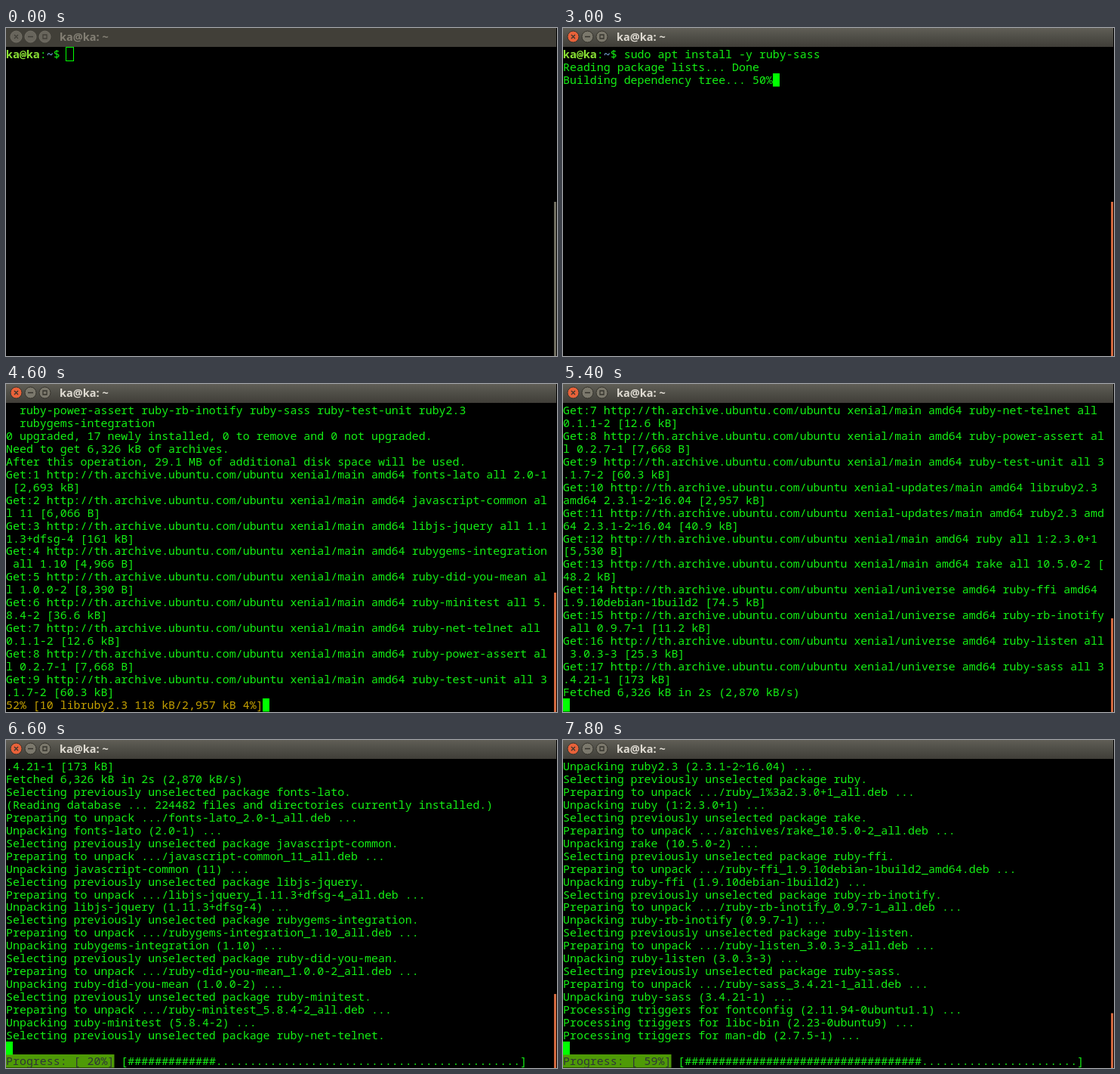
These frames come from a looping animation (730x434 px, 8000 ms). An HTML page:

```html
<!DOCTYPE html>
<html lang="en">
<head>
<meta charset="utf-8">
<title>Terminal</title>
<style>
  html, body { margin: 0; width: 100%; height: 100%; overflow: hidden; background: #000; }
  svg { display: block; width: 730px; height: 434px; }
  .row { font: 14.95px "Noto Sans Mono", monospace; white-space: pre; }
  #title { font: 700 14.5px "Noto Sans", sans-serif; }
</style>
</head>
<body>
<svg viewBox="0 0 730 434">
  <defs>
    <linearGradient id="active" x2="0" y2="1">
      <stop offset="0" stop-color="#605e56"/>
      <stop offset=".45" stop-color="#504f48"/>
      <stop offset="1" stop-color="#403e38"/>
    </linearGradient>
  </defs>
  <rect width="730" height="434"/>
  <rect id="bar" width="729" height="25"/>
  <g id="buttons" stroke-width="1">
    <circle cx="13.5" cy="11.5" r="7.5"/>
    <circle cx="32.5" cy="11.5" r="7.5"/>
    <circle cx="51.5" cy="11.5" r="7.5"/>
  </g>
  <path id="marks" d="M11 9l5 5m0-5l-5 5M29 11.5h7M49 9h5v5h-5z" fill="none" stroke-width="1.3"/>
  <text id="title" x="71" y="17">ka@ka: ~</text>
  <rect id="thumb" x="726" width="3"/>
  <rect id="badge" y="416" width="143.5" height="17.5" fill="#4e9a06"/>
  <rect id="cursor" stroke="#00ff00"/>
  <g id="rows"></g>
  <path id="pointer" d="M-3 -7.5h2l1 1 1-1h2M0 -6.5v13M-3 7.5h2l1-1 1 1h2" fill="none" stroke="#c8c8a0" stroke-width="1.2"/>
</svg>
<script>
const $ = id => document.getElementById(id);
const CELL = 8.97, LINE = 16.95, COLS = 80, ROWS = 24, STEP = 200, LOOP = 8000;
const GREEN = '#14f014', YELLOW = '#c4a000', LIME = '#8ae234', BLUE = '#729fcf', DARK = '#2e3436';

// name, version, section, size, architecture
const packages = `fonts-lato 2.0-1 main 2,693_kB
javascript-common 11 main 6,066_B
libjs-jquery 1.11.3+dfsg-4 main 161_kB
rubygems-integration 1.10 main 4,966_B
ruby-did-you-mean 1.0.0-2 main 8,390_B
ruby-minitest 5.8.4-2 main 36.6_kB
ruby-net-telnet 0.1.1-2 main 12.6_kB
ruby-power-assert 0.2.7-1 main 7,668_B
ruby-test-unit 3.1.7-2 main 60.3_kB
libruby2.3 2.3.1-2~16.04 updates 2,957_kB amd64
ruby2.3 2.3.1-2~16.04 updates 40.9_kB amd64
ruby 1:2.3.0+1 main 5,530_B
rake 10.5.0-2 main 48.2_kB
ruby-ffi 1.9.10debian-1build2 universe 74.5_kB amd64
ruby-rb-inotify 0.9.7-1 universe 11.2_kB
ruby-listen 3.0.3-3 universe 25.3_kB
ruby-sass 3.4.21-1 universe 173_kB`.split('\n').map(line => {
  const [name, version, section, size, arch = 'all'] = line.split(' ');
  return { name, version, section, size: size.replace('_', ' '), arch };
});

const command = 'sudo apt install -y ruby-sass';
const prompt = [['ka@ka', LIME, 700], [':', GREEN], ['~', BLUE, 700], ['$ ', GREEN]];
const common = `  fonts-lato javascript-common libjs-jquery libruby2.3 rake ruby
  ruby-did-you-mean ruby-ffi ruby-listen ruby-minitest ruby-net-telnet
  ruby-power-assert ruby-rb-inotify `;
const plain = text => [[text, GREEN]];

const head = `Reading package lists... Done
Building dependency tree
Reading state information... Done
The following additional packages will be installed:
${common}ruby-test-unit ruby2.3
  rubygems-integration
Suggested packages:
  apache2 | lighttpd | httpd ri ruby-dev bundler
The following NEW packages will be installed:
${common}ruby-sass ruby-test-unit ruby2.3
  rubygems-integration
0 upgraded, 17 newly installed, 0 to remove and 0 not upgraded.
Need to get 6,326 kB of archives.
After this operation, 29.1 MB of additional disk space will be used.`.split('\n');

const gets = packages.flatMap((p, i) => {
  const repo = p.section === 'updates' ? 'xenial-updates/main' : 'xenial/' + p.section;
  const text = `Get:${i + 1} http://th.archive.ubuntu.com/ubuntu ${repo} amd64 ${p.name} ${p.arch} ${p.version} [${p.size}]`;
  return [text.slice(0, COLS), text.slice(COLS)];
});

const unpack = packages.flatMap((p, i) => {
  const label = p.name + (p.name === 'libruby2.3' ? ':amd64' : '');
  const dir = p.name === 'rake' ? '.../archives/' : '.../';
  const lines = [
    `Selecting previously unselected package ${label}.`,
    `Preparing to unpack ${dir}${p.name}_${p.version.replace(':', '%3a')}_${p.arch}.deb ...`,
    `Unpacking ${label} (${p.version}) ...`
  ];
  if (!i) lines.splice(1, 0, '(Reading database ... 224482 files and directories currently installed.)');
  return lines;
});

const triggers = ['fontconfig (2.11.94-0ubuntu1.1)', 'libc-bin (2.23-0ubuntu9)', 'man-db (2.7.5-1)']
  .map(s => `Processing triggers for ${s} ...`);

const log = [
  [...prompt, [command, GREEN]],
  ...[...head, ...gets, 'Fetched 6,326 kB in 2s (2,870 kB/s)', ...unpack, ...triggers].map(plain)
];
const GETS = 1 + head.length;
const UNPACK = GETS + gets.length + 1;

// step, finished lines, unfinished last line
const load = (n, text) => [GETS + 2 * n, text];
const stages = [
  [10, 1, ''],
  [11, 1, 'Reading package lists... 0%'],
  [12, 1, 'Reading package lists... 31%'],
  [13, 1, 'Reading package lists... 78%'],
  [14, 2, 'Building dependency tree... 0%'],
  [15, 2, 'Building dependency tree... 50%'],
  [16, 3, 'Reading state information... 0%'],
  [17, GETS, ''],
  [18, ...load(0, '0% [Working]')],
  [19, ...load(1, '0% [1 fonts-lato 1,204 B/2,693 kB 0%]')],
  [20, ...load(1, '12% [1 fonts-lato 812 kB/2,693 kB 30%]')],
  [21, ...load(2, '43% [3 libjs-jquery 14.2 kB/161 kB 9%]')],
  [22, ...load(5, '48% [6 ruby-minitest 8,192 B/36.6 kB 22%]')],
  [23, ...load(9, '52% [10 libruby2.3 118 kB/2,957 kB 4%]')],
  [24, ...load(9, '74% [10 libruby2.3 1,538 kB/2,957 kB 52%]')],
  [25, ...load(12, '95% [13 rake 12.3 kB/48.2 kB 26%]')],
  [26, ...load(16, '98% [17 ruby-sass 65.5 kB/173 kB 38%]')],
  [27, UNPACK, ''],
  [28, UNPACK + 1, '(Reading database ... 5%'],
  [29, UNPACK + 1, '(Reading database ... 70%'],
  [30, UNPACK + 3, ''], [31, UNPACK + 11, ''], [32, UNPACK + 14, ''],
  [33, UNPACK + 20, ''], [34, UNPACK + 27, ''], [35, UNPACK + 32, ''],
  [36, UNPACK + 36, ''], [37, UNPACK + 43, ''], [38, UNPACK + 50, ''],
  [39, log.length, '']
];

const set = (el, attrs) => { for (const k in attrs) el.setAttribute(k, attrs[k]); };
const make = (tag, parent, attrs) => {
  const el = document.createElementNS('http://www.w3.org/2000/svg', tag);
  set(el, attrs);
  return parent.appendChild(el);
};
const rows = Array.from({ length: ROWS }, (_, i) =>
  make('text', $('rows'), { class: 'row', x: 0, y: 40 + i * LINE }));

function fillRow(el, parts) {
  el.textContent = '';
  for (const [text, fill, weight = 500] of parts)
    make('tspan', el, { fill, 'font-weight': weight }).textContent = text;
}

function drawWindow(on) {
  set($('bar'), { fill: on ? 'url(#active)' : '#413f38' });
  set($('title'), { fill: on ? '#dfdbd2' : '#837f74' });
  set($('marks'), { stroke: on ? '#35332c' : '#413f38' });
  [...$('buttons').children].forEach((c, i) => set(c, {
    fill: on && !i ? '#e8623a' : on ? '#7b786c' : '#68655c',
    stroke: on ? '#35332c' : '#747167'
  }));
  set($('thumb'), { fill: on ? '#d2683e' : '#6f6d60' });
}

function draw(step) {
  const focus = step > 0;
  const [, count, text] = stages.filter(s => s[0] <= step).pop() || [0, 0, ''];
  const tail = step < 10
    ? [...prompt, [step < 5 ? '' : command, GREEN]]
    : [[text, /^\d+%/.test(text) ? YELLOW : GREEN]];
  const barOn = step >= 28;
  const height = barOn ? ROWS - 1 : ROWS;
  const top = Math.max(0, count + 1 - height);
  const view = [...log.slice(0, count), tail].slice(top);

  if (barOn) {
    const done = Math.max(0, Math.floor((count - UNPACK - 1) / 3));
    const pct = Math.floor(3.48 * Math.min(done, packages.length));
    const hashes = Math.round(pct * .58) + 1;
    view[ROWS - 1] = [
      [`Progress: [${String(pct).padStart(3)}%]`, DARK],
      [` [${'#'.repeat(hashes)}${'.'.repeat(58 - hashes)}]`, GREEN]
    ];
  }
  rows.forEach((el, i) => fillRow(el, view[i] || []));
  drawWindow(focus);

  const thumbY = 434 - 408 * ROWS / (2 * ROWS + top);
  set($('thumb'), { y: thumbY, height: 434 - thumbY });
  set($('badge'), { visibility: barOn ? 'visible' : 'hidden' });

  const col = tail.reduce((n, part) => n + part[0].length, 0);
  const x = Math.floor(col * CELL), y = Math.round(26 + (count - top) * LINE);
  set($('cursor'), focus
    ? { x, y, width: 9, height: 17.5, fill: '#00ff00', 'stroke-width': 0 }
    : { x: x - .5, y: y - .5, width: 10, height: 18, fill: 'none', 'stroke-width': 1 });
  set($('cursor'), { visibility: step === 35 ? 'hidden' : 'visible' });

  const k = Math.min(1, Math.max(0, (step - 2) / 4));
  set($('pointer'), {
    visibility: step > 1 && step < 10 ? 'visible' : 'hidden',
    transform: `translate(${500 + 60 * (1 - k)} ${159.5 + 50 * (1 - k)})`
  });
}

let last = -1;
const start = performance.now();
function tick(now) {
  const step = Math.floor((Math.max(0, now - start) % LOOP) / STEP);
  if (step !== last) draw(last = step);
  requestAnimationFrame(tick);
}
tick(start);
</script>
</body>
</html>
```
